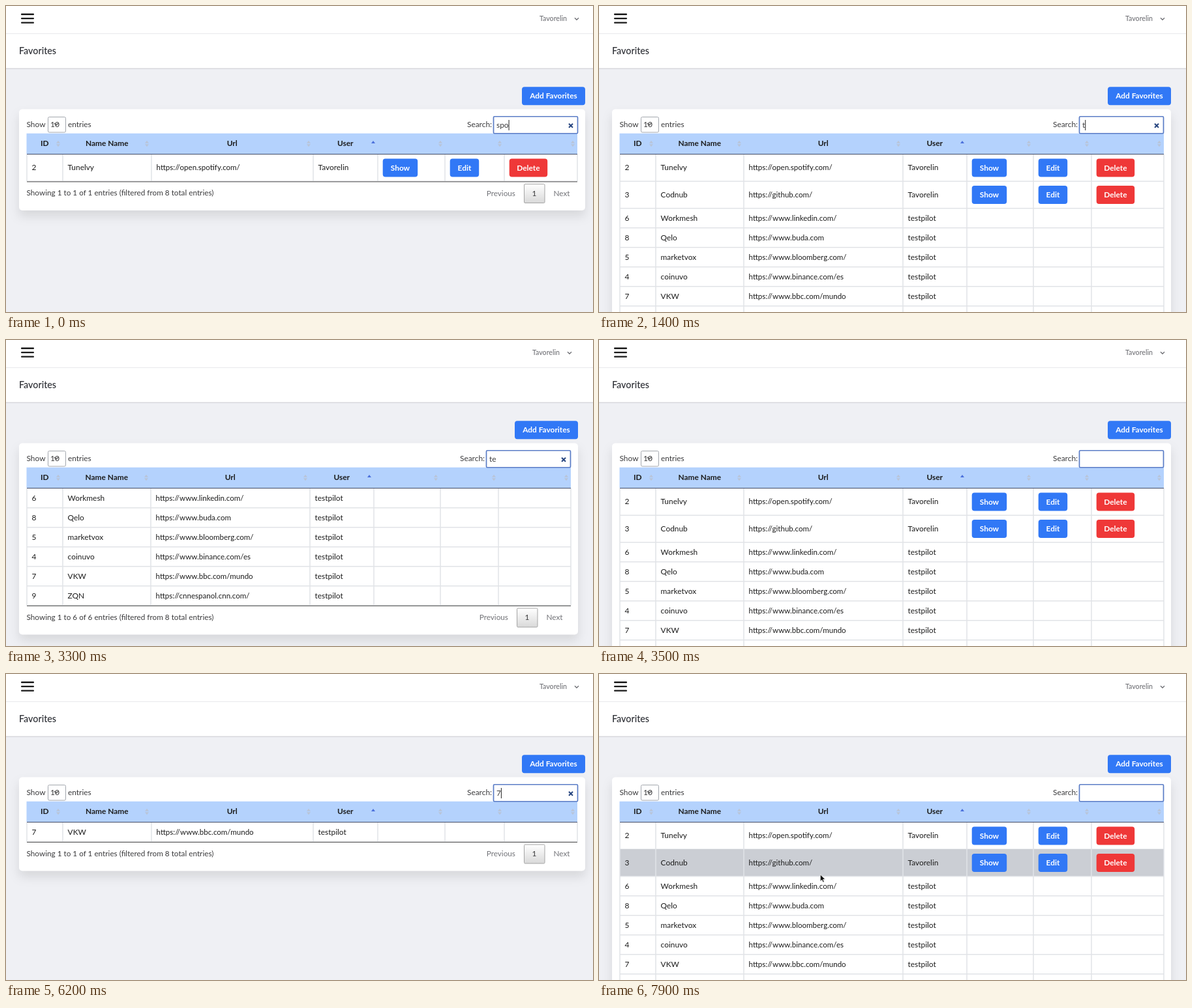
Recreate the animation shown at these times as an HTML page. Size 900 by 470 pixels, loop 8 s.

```html
<!DOCTYPE html>
<html lang="en">
<head>
<meta charset="utf-8">
<title>Favorites</title>
<style>
  html, body { margin: 0; width: 100%; height: 100%; overflow: hidden; background: #eff0f4; }
  svg { display: block; width: 100vw; height: 100vh; font: 11.9px Lato, sans-serif; fill: #1c1c1c; }
  .bold { font-weight: 700; }
  .button { font-weight: 700; fill: #fff; text-anchor: middle; }
  .mid { text-anchor: middle; }
  .end { text-anchor: end; }
  .soft { fill: #3a3a3c; }
  .foot { font-size: 11.75px; }
  .muted { fill: #717277; }
  .small { font-size: 10.6px; font-weight: 500; }
  .url { font-size: 11.55px; }
  .title { font-size: 14.3px; font-weight: 500; fill: #2b2d33; }
  .card { fill: #fff; filter: drop-shadow(0 9px 8px rgba(0, 0, 0, .1)); }
</style>
</head>
<body>
<svg id="stage" viewBox="0 0 900 470" xmlns="http://www.w3.org/2000/svg"></svg>
<script>
const LOOP = 8000;
const OWNER = 'Tavorelin', GUEST = 'testpilot';
const BLUE = '#3178f6', RED = '#ef3838';

const entries = [
  [2, 'Tunelvy', 'https://open.spotify.com/', OWNER],
  [3, 'Codnub', 'https://github.com/', OWNER],
  [6, 'Workmesh', 'https://www.linkedin.com/', GUEST],
  [8, 'Qelo', 'https://www.buda.com', GUEST],
  [5, 'marketvox', 'https://www.bloomberg.com/', GUEST],
  [4, 'coinuvo', 'https://www.binance.com/es', GUEST],
  [7, 'VKW', 'https://www.bbc.com/mundo', GUEST],
  [9, 'ZQN', 'https://cnnespanol.cnn.com/', GUEST],
];

// Search text over time
const typing = [
  [0, 'spo'], [100, 'sp'], [200, 's'], [400, ''],
  [1300, 't'], [1500, 'te'], [1700, 'tes'], [1800, 'test'],
  [3000, 'tes'], [3200, 'te'], [3400, 't'], [3500, ''],
  [5200, '7'], [6700, ''],
];
const blinkStarts = [0, 1300, 1800, 5200];
const HOVER_TIME = 7600, HOVER_ID = 3;

// Column edges with and without the page scrollbar
const narrowColumns = [32, 87, 222, 466, 564, 666, 755, 866];
const wideColumns = [32, 87, 223, 471, 570, 673, 764, 876];

const stage = document.getElementById('stage');
const pen = document.createElement('canvas').getContext('2d');

const rect = (x, y, w, h, fill, extra = '') =>
  `<rect x="${x}" y="${y}" width="${w}" height="${h}" fill="${fill}" ${extra}/>`;
const text = (x, y, content, cls = '') => `<text x="${x}" y="${y}" class="${cls}">${content}</text>`;
const path = (d, stroke, width, fill = 'none') =>
  `<path d="${d}" stroke="${stroke}" stroke-width="${width}" fill="${fill}"/>`;
const button = (x, y, w, label, color) =>
  rect(x, y, w, 28, color, 'rx="4"') + text(x + w / 2, y + 18, label, 'button');
const chevron = (x, y, color) => path(`M${x - 3} ${y - 1.5}l3 3l3-3`, color, 1.4);
const triangle = (x, y, dir, color) => path(`M${x - 3} ${y}h6l-3 ${4 * dir}z`, 'none', 0, color);

const last = (list, t, key = item => item) => list.filter(item => key(item) <= t).pop();

function stateAt(t) {
  const query = last(typing, t, step => step[0])[1];
  const caret = Math.floor((t - last(blinkStarts, t)) / 500) % 2 === 0;
  return { query, caret, hover: t >= HOVER_TIME };
}

function pageTop(shift) {
  return rect(0, 0, 900, 470, '#eff0f4') +
    rect(0, 0, 900, 95.5, '#fff') +
    rect(0, 42, 900, 1, '#e8e9ec') +
    rect(0, 95.5, 900, 1.5, '#d9dade') +
    [11.6, 18, 24.4].map(y => rect(23, y, 20, 2.3, '#1a1a1a', 'rx="1"')).join('') +
    text(807 + shift, 23, OWNER, 'muted small') +
    chevron(864 + shift, 19.7, '#717277') +
    text(20, 74, 'Favorites', 'title') +
    button(780 + shift, 124.3, 97, 'Add Favorites', BLUE);
}

function controls(shift, { query, caret }) {
  const left = 736 + shift, caretX = left + 5.5 + pen.measureText(query).width;
  return text(31.5, 186, 'Show', 'soft') +
    rect(64.5, 170.5, 27, 23.5, '#fff', 'stroke="#a3a7ae" rx="2"') +
    text(68, 186, '10', 'soft') + chevron(77, 181.5, '#555') +
    text(95, 186, 'entries', 'soft') +
    text(left - 2, 186, 'Search:', 'soft end') +
    rect(left + .5, 169.75, 129, 26, '#fff', 'stroke="#5a7cc6" stroke-width="1.7" rx="1.5"') +
    text(left + 5, 186.5, query, 'soft') +
    (query ? path(`M${left + 116} 180.8l6 6m0-6l-6 6`, '#26457f', 2) : '') +
    (caret ? rect(caretX - .5, 175, 1, 16, '#222') : '');
}

function tableHead(cols) {
  const labels = ['ID', 'Name Name', 'Url', 'User'];
  let out = rect(31.5, 195.7, cols[7] - 31.5, 31.3, '#b4d2fd');
  cols.slice(1).forEach((edge, i) => {
    const x = edge - 7;
    if (labels[i]) out += text((cols[i] + edge) / 2 - .3, 215, labels[i], 'bold mid');
    out += i === 3 ? triangle(x, 211, -1, '#4b70dc')
      : triangle(x, 210.7, -1, '#b9c4d8') + triangle(x, 212.3, 1, '#b9c4d8');
  });
  return out;
}

function tableRows(rows, cols, hover) {
  const right = cols[7];
  let y = 227.5, out = '';
  for (const [id, name, url, user] of rows) {
    const owned = user === OWNER, h = owned ? 41.5 : 30, base = y + h / 2 + 4;
    if (hover && id === HOVER_ID) out += rect(32, y, right - 32, h, '#cbced4');
    [id, name, url, user].forEach((value, i) => {
      out += text(cols[i] + 7.6, base, value, i === 2 ? 'url' : '');
    });
    if (owned) {
      out += button(cols[4] + 7.7, y + 7, 53.5, 'Show', BLUE) +
        button(cols[5] + 7.7, y + 7, 44.5, 'Edit', BLUE) +
        button(cols[6] + 7.7, y + 7, 58.5, 'Delete', RED);
    }
    y += h;
    out += rect(32, y - .5, right - 32, 1.5, '#e1e3e7');
  }
  out += cols.map(x => rect(x - .75, 228, 1.5, y - 228, '#e1e3e7')).join('');
  out += rect(32, 227, right - 32, 1.2, '#545e78') + rect(32, y + .3, right - 32, 1.2, '#666');
  return { out, bottom: y };
}

function tableFoot(y, shift, count) {
  const filtered = count < entries.length ? ` (filtered from ${entries.length} total entries)` : '';
  return text(31.5, y + 22, `Showing 1 to ${count} of ${count} entries${filtered}`, 'soft foot') +
    text(725.7 + shift, y + 22.5, 'Previous', 'muted foot') +
    rect(783.5 + shift, y + 4.5, 31.5, 29, 'url(#page)', 'stroke="#a5a5a5" rx="1.5"') +
    text(799 + shift, y + 22.5, '1', 'soft mid') +
    text(828.5 + shift, y + 22.5, 'Next', 'muted foot');
}

function draw(state) {
  const rows = entries.filter(row => row.join(' ').toLowerCase().includes(state.query));
  const wide = rows.length < 3, shift = wide ? 11 : 0;
  const cols = wide ? wideColumns : narrowColumns;
  const table = tableRows(rows, cols, state.hover);
  const pointer = path('M339.3 308v10.5l2.5-2.2l1.7 3.8l1.8-.8l-1.7-3.8h3.3z', '#fff', .7, '#111');

  pen.font = '11.9px Lato, sans-serif';
  stage.innerHTML =
    `<linearGradient id="page" x2="0" y2="1"><stop stop-color="#fff"/>
     <stop offset="1" stop-color="#d9d9d9"/></linearGradient>` +
    pageTop(shift) +
    `<rect class="card" x="20" y="158.5" width="${857 + shift}" height="${table.bottom - 113.5}" rx="5"/>` +
    tableHead(cols) + table.out + controls(shift, state) +
    tableFoot(table.bottom, shift, rows.length) +
    (state.hover ? pointer : '');
}

let shown = '';
const start = performance.now();
function tick() {
  const state = stateAt((performance.now() - start) % LOOP);
  const key = JSON.stringify(state);
  if (key !== shown) {
    shown = key;
    draw(state);
  }
  requestAnimationFrame(tick);
}
tick();
</script>
</body>
</html>
```
